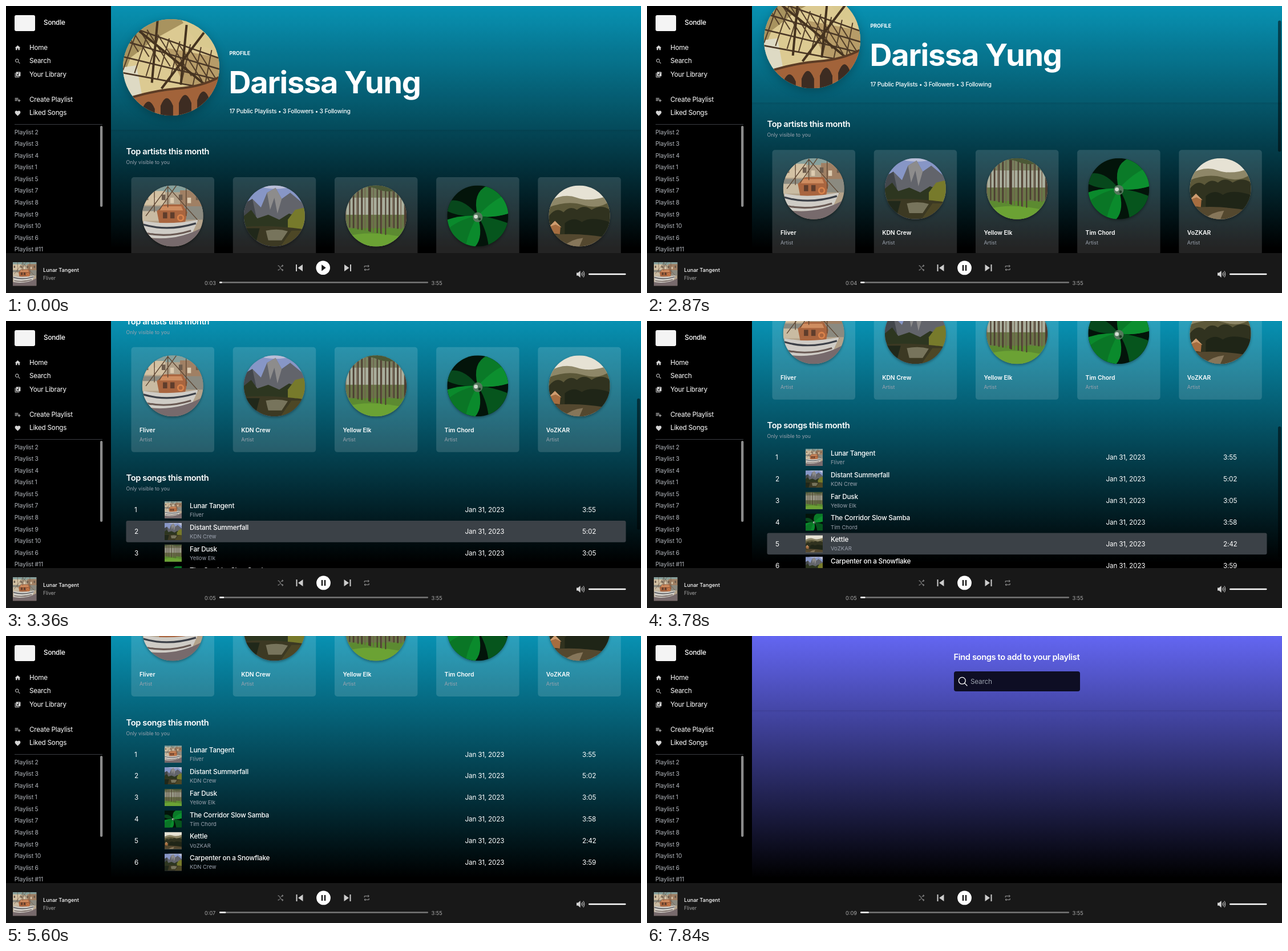
Recreate the animation shown at these times as an HTML page. Size 1113x503 px, loop 8 s.

```html
<!DOCTYPE html>
<html lang="en">
<head>
<meta charset="utf-8">
<title>Music player</title>
<style>
html, body { margin: 0; width: 100%; height: 100%; overflow: hidden; background: #000; }
svg { display: block; }
text { font-family: Inter, "Open Sans", sans-serif; fill: #fff; white-space: pre; }
.soft { filter: drop-shadow(0 2px 2px rgba(0,0,0,.35)); }
.deep { filter: drop-shadow(0 4px 8px rgba(0,0,0,.25)); }
</style>
</head>
<body>
<svg id="stage" width="1113" height="503" viewBox="0 0 1113 503" xmlns="http://www.w3.org/2000/svg"></svg>
<script>
const LOOP = 8000, PLAY_AT = 1330, PAGE_AT = 6300;
const SONG_TOP = 566.2, ROW_H = 37.85;
const GREY = '#9ca3af';
const $ = id => document.getElementById(id);
const clamp = v => Math.max(0, Math.min(1, v));
const times = (n, fn) => Array.from({ length: n }, (_, i) => fn(i)).join('');

const rect = (x, y, w, h, fill, more = '') =>
  `<rect x="${x}" y="${y}" width="${w}" height="${h}" fill="${fill}" ${more}/>`;
const path = (d, fill, more = '') => `<path d="${d}" fill="${fill}" ${more}/>`;
const line = (d, color, w, more = '') =>
  path(d, 'none', `stroke="${color}" stroke-width="${w}" ${more}`);
const disc = (x, y, r, fill) => `<circle cx="${x}" cy="${y}" r="${r}" fill="${fill}"/>`;
const text = (x, y, s, size, { w = 400, c = '#fff', ls = size > 10 ? -.018 : 0, id = '' } = {}) =>
  `<text x="${x}" y="${y}" font-size="${size}" font-weight="${w}" style="fill:${c};letter-spacing:${ls}em" ${id && `id="${id}"`}>${s}</text>`;
const icon = (cx, cy, k, d, fill = '#d4d4d4') =>
  path(d, fill, `transform="translate(${cx - 12 * k} ${cy - 12 * k}) scale(${k})"`);
const fade = (id, y, from, to) =>
  `<linearGradient id="${id}" ${y ? `gradientUnits="userSpaceOnUse" x1="0" y1="0" y2="${y}"` : 'y2="1"'} x2="0"><stop stop-color="${from}"/><stop offset="1" stop-color="${to}"/></linearGradient>`;

// Simplified pictures on a 100 x 100 field
const pics = {
  bridge: rect(0, 0, 100, 100, '#dcca92') +
    path('M0 0H70L34 20 8 40 0 60Z', '#a8935f') + path('M60 0H100V34L78 26Z', '#d9c98f') +
    path('M46 30 100 40V76L62 66Z', '#b79c68') +
    path('M0 50 14 48 20 80 0 84Z', '#dedac4') +
    times(9, i => line(`M${i * 11 + 4} ${8 + i * 3}L${i * 12 - 12} ${50 + i * 3}M${i * 11 - 8} ${i * 5 - 4}L${i * 11 + 16} ${34 + i * 5}`, '#54402a', 1.2)) +
    times(4, i => line(`M-4 ${i * 17 + 4}L104 ${i * 11 + 42}`, '#4b3826', 1.6)) +
    line('M14 10 90 72M36 0 30 66M66 6 60 68M84 14 40 72', '#45331f', 2.4) +
    path('M0 84Q30 74 56 72T100 60V100H0Z', '#a2633a') + line('M0 84Q30 74 56 72T100 60', '#5c3c25', 2.4) +
    times(4, i => path(`M${20 + i * 19} 102V${93 - i * 3}Q${26.5 + i * 19} ${78 - i * 4} ${33 + i * 19} ${93 - i * 3}V102Z`, '#3d2c22')),
  ship: rect(0, 0, 100, 100, '#b3a28a') +
    rect(0, 0, 100, 11, '#86a09c') + path('M0 9H38V32H0Z', '#d3c1a3') + path('M62 8H100V38H62Z', '#a08064') +
    times(7, i => rect(4 + i * 14, 15 + i % 2 * 5, 6, 9, i % 2 ? '#dccbb0' : '#6d5c4d')) +
    path('M0 34H100V56H0Z', '#8b8a80') + path('M0 42H30V58H0Z', '#c9bba2') +
    path('M24 42 36 31H66L74 44 70 62H28Z', '#a9653f') + path('M32 34H64L67 41H29Z', '#cf8d60') +
    rect(34, 44, 7, 10, '#5f3d2c') + rect(46, 44, 7, 10, '#5f3d2c') +
    '<circle cx="63" cy="53" r="4.5" fill="none" stroke="#d9824a" stroke-width="2.6"/>' +
    line('M42 0V36M42 2 6 50M42 2 92 58M72 0V50M20 0V44M56 0 28 40', '#5f4835', 1.3) +
    path('M2 58Q42 66 92 56L82 78Q46 92 4 84Z', '#cfccc6') +
    line('M2 64Q42 76 88 62', '#3c4048', 3) + line('M6 78Q42 86 80 74', '#6a5a54', 3) +
    path('M0 84Q54 94 100 68V100H0Z', '#776a6c'),
  valley: rect(0, 0, 100, 100, '#8796c6') + path('M18 0Q50 10 78 2L100 18V0Z', '#b9bed8') +
    path('M0 30 14 22 28 36 38 12 52 4 62 22 76 12 100 32V64H0Z', '#62646b') +
    path('M38 12 43 40 50 20 55 46 62 22 52 4Z', '#8d8c8c') + path('M0 30 14 22 20 50 0 54Z', '#43474c') +
    path('M0 50 12 40 22 54 40 48 58 56 74 46 86 50V78H0Z', '#2d3620') +
    path('M72 56 84 40 100 36V76H72Z', '#777a2b') +
    path('M0 68Q44 64 100 72V100H0Z', '#3c3923') + path('M36 74Q56 70 72 75L62 90H40Z', '#77745c') +
    path('M0 70 26 70 18 100H0Z', '#20281a') + path('M78 74H100V100H60Z', '#4d4726'),
  forest: rect(0, 0, 100, 100, '#a9ae9c') + rect(0, 0, 100, 20, '#78815f') + rect(0, 48, 100, 24, '#697648') +
    rect(0, 70, 100, 30, '#5c8a31') + path('M0 84Q40 72 100 86V100H0Z', '#6ba234') +
    times(21, i => rect(i * 4.9 + i * 37 % 4, -2, 1.2 + i * 13 % 3 * .7, 70 + i * 29 % 14, i % 3 ? '#4d3d31' : '#6f5a49')) +
    path('M0 0H100V5Q70 14 52 6T0 10Z', '#4b5836'),
  leaf: rect(0, 0, 100, 100, '#03140a') +
    path('M50 50Q20 52 0 42V26Q26 18 50 50Z', '#07481c') +
    path('M50 50Q40 12 66 0H100V46Q74 54 50 50Z', '#0a7a28') +
    path('M50 50Q76 22 100 14V46Q74 54 50 50Z', '#0c8f2f') +
    path('M50 50Q74 52 100 62V100H68Q64 70 50 50Z', '#06551d') +
    path('M50 50Q60 84 46 100H0V56Q24 48 50 50Z', '#0a8a2c') +
    path('M50 50Q36 72 30 100H0V72Q22 54 50 50Z', '#0a7626') +
    disc(50, 52, 8, '#54785c') + disc(47, 51, 3.2, '#d5ded3') + disc(53, 55, 2.2, '#1e3c25'),
  hill: rect(0, 0, 100, 100, '#e6e2d4') +
    path('M0 26Q24 12 46 20T100 16V60H0Z', '#8e8768') + path('M0 36Q30 24 56 32T100 26V70H0Z', '#5c5839') +
    path('M0 50Q12 34 24 44 34 32 46 40 58 30 70 40 86 30 100 40V92H0Z', '#30321f') +
    path('M26 62Q40 50 54 60 68 50 100 60V88H26Z', '#1f2517') +
    path('M0 82Q40 76 100 86V100H0Z', '#54482f') + path('M24 100Q36 88 56 86L50 100Z', '#86765a') +
    path('M2 66 10 59 19 68 18 80 2 78Z', '#a56d40') + path('M0 68 10 58 21 69 11 64Z', '#cf9d70')
};
const pic = (name, x, y, size, clip) =>
  `<g transform="translate(${x} ${y}) scale(${size / 100})" clip-path="url(#${clip})"><use href="#${name}"/></g>`;

const artists = [['ship', 'Fliver'], ['valley', 'KDN Crew'], ['forest', 'Yellow Elk'], ['leaf', 'Tim Chord'], ['hill', 'VoZKAR']];
const songs = [
  ['Lunar Tangent', 0, '3:55'], ['Distant Summerfall', 1, '5:02'], ['Far Dusk', 2, '3:05'],
  ['The Corridor Slow Samba', 3, '3:58'], ['Kettle', 4, '2:42'], ['Carpenter on a Snowflake', 1, '3:59']
];
const lists = ['2', '3', '4', '1', '5', '7', '8', '9', '10', '6', '#11'];
const head = { w: 600, ls: -.026 };

const card = i => {
  const x = 219.5 + i * 178.2, [img, name] = artists[i];
  return rect(x, 300, 145.5, 184, '#fff', 'fill-opacity=".14" rx="5"') +
    `<g class="soft">${pic(img, x + 19.2, 314.5, 107, 'round')}</g>` +
    text(x + 14.5, 449.2, name, 10.3, { w: 600, ls: 0 }) + text(x + 14.5, 465.3, 'Artist', 8.9, { c: GREY });
};
const song = i => {
  const y = SONG_TOP + i * ROW_H, [name, a, len] = songs[i];
  return text(225, y + 23.4, i + 1, 11.75) + pic(artists[a][0], 278, y + 4, 30, 'square') +
    text(322, y + 15.8, name, 11.75, { w: 500 }) + text(322, y + 31, artists[a][1], 9.5, { c: GREY }) +
    text(804.5, y + 23.4, 'Jan 31, 2023', 11.75) + text(1010, y + 23.4, len, 11.75);
};

const profile =
  rect(184, 0, 929, 433, 'url(#cyan)') +
  '<g id="page">' +
  rect(184, 0, 929, 217, '#0891b2', 'fill-opacity=".04"') + rect(184, 217, 929, 5, 'url(#shade)') +
  `<g class="deep">${pic('bridge', 205, 23, 169, 'round')}</g>` +
  text(391.5, 86, 'PROFILE', 8.9, { w: 700 }) +
  text(390.5, 153, 'Darissa Yung', 54, { w: 700, ls: -.022 }) +
  text(391.5, 188.4, '17 Public Playlists • 3 Followers • 3 Following', 10.3, { w: 500 }) +
  text(210.5, 260.2, 'Top artists this month', 14.7, head) + text(210.5, 276.9, 'Only visible to you', 8.82, { c: GREY }) +
  times(5, card) +
  text(210.5, 534.6, 'Top songs this month', 14.7, head) + text(210.5, 551.5, 'Only visible to you', 8.82, { c: GREY }) +
  rect(210.5, 0, 876, ROW_H, '#3b4147', 'id="hover" rx="3"') + times(6, song) +
  '</g>' + rect(1106, 0, 5.5, 230, '#000', 'id="thumb" rx="2.7"');

const finder =
  rect(184, 0, 929, 433, 'url(#indigo)') + rect(184, 130, 929, 4, 'url(#shade)') +
  text(537.5, 42.4, 'Find songs to add to your playlist', 14.7, head) +
  rect(538, 62, 221, 35, '#0e0e24', 'rx="4"') +
  '<circle cx="552.3" cy="78.3" r="5.9" fill="none" stroke="#fff" stroke-width="1.3"/>' +
  line('M556.6 82.6 561 87', '#fff', 1.3, 'stroke-linecap="round"') +
  text(567, 83.9, 'Search', 11.75, { c: GREY });

const nav = [
  [73, 'Home', 'M10 20v-6h4v6h5v-8h3L12 3 2 12h3v8z'],
  [96.6, 'Search', 'M15.5 14h-.8l-.3-.3A6.5 6.5 0 1 0 13.7 14.4l.3.3v.8l5 5L20.5 19zM9.5 14a4.5 4.5 0 1 1 0-9 4.5 4.5 0 0 1 0 9z'],
  [120, 'Your Library', 'M20 2H8a2 2 0 0 0-2 2v12c0 1.1.9 2 2 2h12a2 2 0 0 0 2-2V4a2 2 0 0 0-2-2zm-2 5h-3v5.5a2.5 2.5 0 1 1-1-2V5h4zM4 6H2v14c0 1.1.9 2 2 2h14v-2H4z'],
  [164, 'Create Playlist', 'M14 10H2v2h12zm0-4H2v2h12zm4 8v-4h-2v4h-4v2h4v4h2v-4h4v-2zM2 16h8v-2H2z'],
  [187.7, 'Liked Songs', 'M12 21.35l-1.45-1.32C5.4 15.36 2 12.28 2 8.5 2 5.4 4.4 3 7.5 3c1.7 0 3.4.8 4.5 2.1C13.1 3.8 14.8 3 16.5 3 19.6 3 22 5.4 22 8.5c0 3.8-3.4 6.9-8.55 11.5z']
];
const sidebar =
  rect(0, 0, 184, 433, '#000') + rect(15, 16, 36, 28, '#f4f4f4', 'rx="3"') +
  text(66, 33.2, 'Sondle', 11.75, { w: 500 }) +
  nav.map(([y, s, d]) => icon(20.5, y + .3, .49, d) + text(41, y + 3.5, s, 11.7)).join('') +
  rect(15, 207, 154, 1, '#3a3d42') +
  lists.map((n, i) => text(14.7, 224.5 + 20.58 * i, 'Playlist ' + n, 10.3, { c: '#b4b8be', ls: -.014 })).join('') +
  rect(165, 210, 4.3, 142, '#8b8b8b', 'rx="2.1"');

const small = { c: '#a9a9a9' };
const player =
  rect(0, 433, 1113, 70, '#181818') + pic('ship', 12, 449, 41.5, 'square') +
  text(65, 466.2, songs[0][0], 9.15, { w: 500 }) + text(65, 480.3, 'Fliver', 8.5, small) +
  line('M476.5 455.2H478.2L483.4 462.8H485.5M476.5 462.8H478.2L479.8 460.5M481.8 457.5 483.4 455.2H485.5M484 453.5 485.8 455.2 484 456.9M484 461.1 485.8 462.8 484 464.5', '#a3a3a3', 1) +
  line('M628.2 458.2V455.8H636.2M634.4 454 636.3 455.8 634.4 457.6M636.2 459.8V462.2H628.2M630 460.4 628.1 462.2 630 464', '#a3a3a3', 1) +
  '<g id="prev">' + icon(514.5, 459, 1, 'M6 6h2v12H6zm3.5 6l8.5 6V6z', '#ccc') + '</g>' +
  '<g id="next">' + icon(598.5, 459, 1, 'M6 18l8.5-6L6 6zM16 6v12h2V6z', '#ccc') + '</g>' +
  '<g id="play">' + disc(555.7, 458.8, 12.3, '#fff') + icon(555.7, 458.8, 1.25, 'M10 16.5l6-4.5-6-4.5z', '#181818') + '</g>' +
  '<g id="pause">' + disc(556.5, 458.9, 12.4, '#fff') + icon(556.5, 458.9, 1.25, 'M9 8h2v8H9zM13 8h2v8h-2z', '#181818') + '</g>' +
  text(348, 488.6, '0:03', 9.2, { ...small, id: 'clock' }) + text(745.5, 488.6, '3:55', 9.2, small) +
  rect(374, 483.3, 366, 2.4, '#777', 'rx="1.2"') + rect(374, 483.3, 5, 2.4, '#fff', 'id="bar" rx="1.2"') +
  path('M1000 467.4H1002.7L1006.6 464V476L1002.7 472.6H1000Z', '#d4d4d4') +
  line('M1008.3 467.7Q1010 470 1008.3 472.3M1010.2 466Q1012.9 470 1010.2 474M1012 464.4Q1015.6 470 1012 475.6', '#d4d4d4', 1) +
  rect(1021, 468.8, 65.5, 2.4, '#fff', 'rx="1.2"');

$('stage').innerHTML = '<defs>' +
  fade('cyan', 424, '#0891b2', '#000') + fade('indigo', 424, '#6366f1', '#000') +
  fade('shade', 0, 'rgba(0,0,0,.09)', 'rgba(0,0,0,0)') +
  '<clipPath id="round"><circle cx="50" cy="50" r="50"/></clipPath><clipPath id="square"><rect width="100" height="100"/></clipPath>' +
  Object.entries(pics).map(([id, s]) => `<g id="${id}">${s}</g>`).join('') + '</defs>' +
  `<g id="profile">${profile}</g><g id="finder">${finder}</g>` + sidebar + player;

// Scroll stops: time, offset, speed
const stops = [[2700, 0, 0], [3080, 154, .42], [3780, 346, .15], [4130, 378, 0]];
function scrollAt(t) {
  if (t <= stops[0][0]) return 0;
  const i = stops.findIndex(s => s[0] > t);
  if (i < 0) return 378;
  const [t0, a, va] = stops[i - 1], [t1, b, vb] = stops[i], d = t1 - t0, u = (t - t0) / d;
  return a + (b - a) * u * u * (3 - 2 * u) + d * u * (1 - u) * (va * (1 - u) - vb * u);
}

const show = (id, on) => $(id).setAttribute('display', on ? 'inline' : 'none');
const set = (id, k, v) => $(id).setAttribute(k, v);

function draw(t) {
  const playing = t >= PLAY_AT, y = scrollAt(t);
  const sec = 3.22 + Math.max(0, t - PLAY_AT) / 1000;
  show('profile', t < PAGE_AT);
  show('finder', t >= PAGE_AT);
  show('play', !playing);
  show('pause', playing);
  set('prev', 'transform', `translate(${playing ? 0 : -.5})`);
  set('next', 'transform', `translate(${playing ? 0 : .5})`);
  $('clock').textContent = '0:0' + Math.floor(sec);
  set('bar', 'width', Math.floor(sec * 4) / 4 / 235 * 366);

  set('page', 'transform', `translate(0 ${-y})`);
  set('thumb', 'y', y * 433 / 811);
  set('thumb', 'opacity', .5 * clamp((t - 2700) / 70) * clamp((4850 - t) / 250));
  const pointer = 375 - 200 * clamp((t - 5390) / 210);
  const row = Math.floor((pointer + y - SONG_TOP) / ROW_H);
  show('hover', row >= 0 && row < songs.length);
  set('hover', 'y', SONG_TOP + Math.max(0, row) * ROW_H);
}

function tick() {
  draw(performance.now() % LOOP);
  requestAnimationFrame(tick);
}
tick();
</script>
</body>
</html>
```
